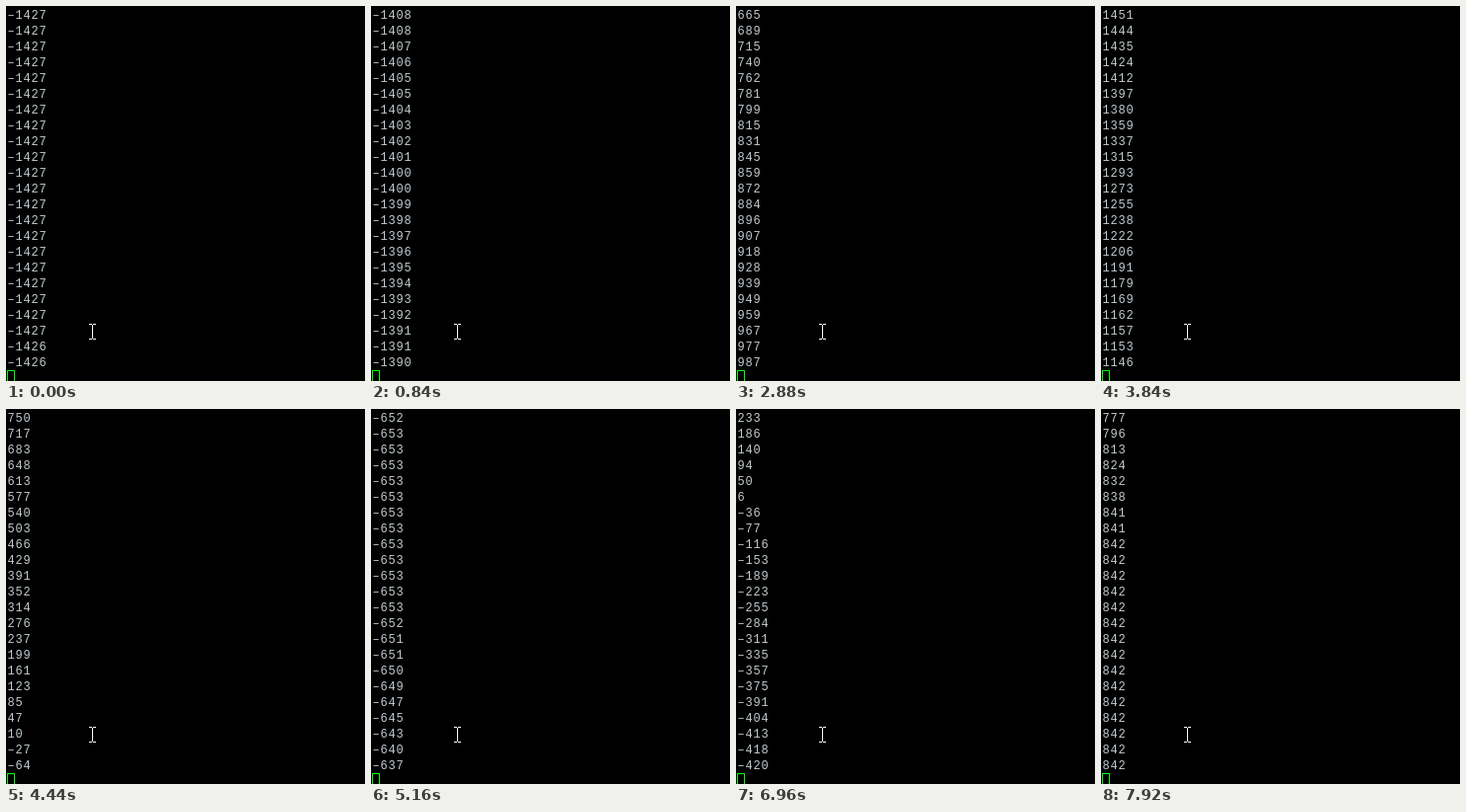
An HTML page that plays this animation: 363x380 px, repeating every 8 s.

```html
<!DOCTYPE html>
<html lang="en">
<head>
<meta charset="utf-8">
<title>Serial readings</title>
<style>
  html, body { margin: 0; width: 100%; height: 100%; overflow: hidden; background: #000; }
  svg { display: block; width: 363px; height: 380px; }
  text {
    font: 12px "Liberation Mono", "DejaVu Sans Mono", monospace;
    letter-spacing: .8px;
    fill: #c2cace;
  }
</style>
</head>
<body>
<svg viewBox="0 0 363 380">
  <rect width="363" height="380" fill="#000"/>
  <g id="rows"></g>
  <g fill="none" shape-rendering="crispEdges">
    <rect x="1.5" y="369.5" width="7" height="15" stroke="#0f0"/>
    <path d="M84 322.5h3m1 0h3M87.5 323v14M84 337.5h3m1 0h3" stroke="#fff"/>
  </g>
</svg>
<script>
const LOOP = 8000, STEP = 120, ROWS = 23, LINES_PER_STEP = 8;

// Key points of the sensor curve: [line, reading]. Line 0 is the newest at the start.
const keys = [
  [-22, -1427], [-4, -1427], [0, -1426], [50, -1395], [80, -1345],
  [90, -1151], [93, -957], [96, -723], [99, -578], [102, -544], [112, -542],
  [170, 665], [174, 762], [180, 859], [188, 949], [192, 987], [222, 1488],
  [234, 1451], [238, 1412], [246, 1255], [252, 1169], [256, 1146],
  [323, -653], [332, -653], [338, -650], [344, -637],
  [378, 541], [386, 711], [393, 898], [400, 1058], [414, 1170],
  [464, -420], [484, -60],
  [506, 777], [509, 824], [512, 841], [516, 842], [528, 842]
];

const width = i => keys[i + 1][0] - keys[i][0];
const slope = i => (keys[i + 1][1] - keys[i][1]) / width(i);

// Weighted harmonic mean of both slopes, flat at peaks, so the curve never overshoots.
function tangent(i) {
  if (i === 0 || i === keys.length - 1) return 0;
  const a = slope(i - 1), b = slope(i);
  if (a * b <= 0) return 0;
  const wa = 2 * width(i) + width(i - 1), wb = width(i) + 2 * width(i - 1);
  return (wa + wb) / (wa / a + wb / b);
}

function reading(line) {
  let i = 0;
  while (i < keys.length - 2 && line >= keys[i + 1][0]) i++;
  const h = width(i), t = (line - keys[i][0]) / h, u = 1 - t;
  return Math.round(
    keys[i][1] * u * u * (1 + 2 * t) + keys[i + 1][1] * t * t * (3 - 2 * t) +
    h * t * u * (tangent(i) * u - tangent(i + 1) * t));
}

// The en dash sits as low and as wide as a terminal minus.
const format = v => (v < 0 ? "\u2013" : "") + Math.abs(v);

const group = document.getElementById("rows");
const rows = Array.from({ length: ROWS }, (_, i) => {
  const row = document.createElementNS(group.namespaceURI, "text");
  row.setAttribute("x", 1.4);
  row.setAttribute("y", 13 + 16 * i);
  return group.appendChild(row);
});

let shown = -1;

function draw(ms) {
  const step = Math.floor((ms % LOOP) / STEP);
  if (step === shown) return;
  shown = step;
  const newest = step * LINES_PER_STEP;
  rows.forEach((row, i) => {
    row.textContent = format(reading(newest - ROWS + 1 + i));
  });
}

const began = performance.now();
function tick() {
  draw(performance.now() - began);
  requestAnimationFrame(tick);
}
tick();
</script>
</body>
</html>
```
